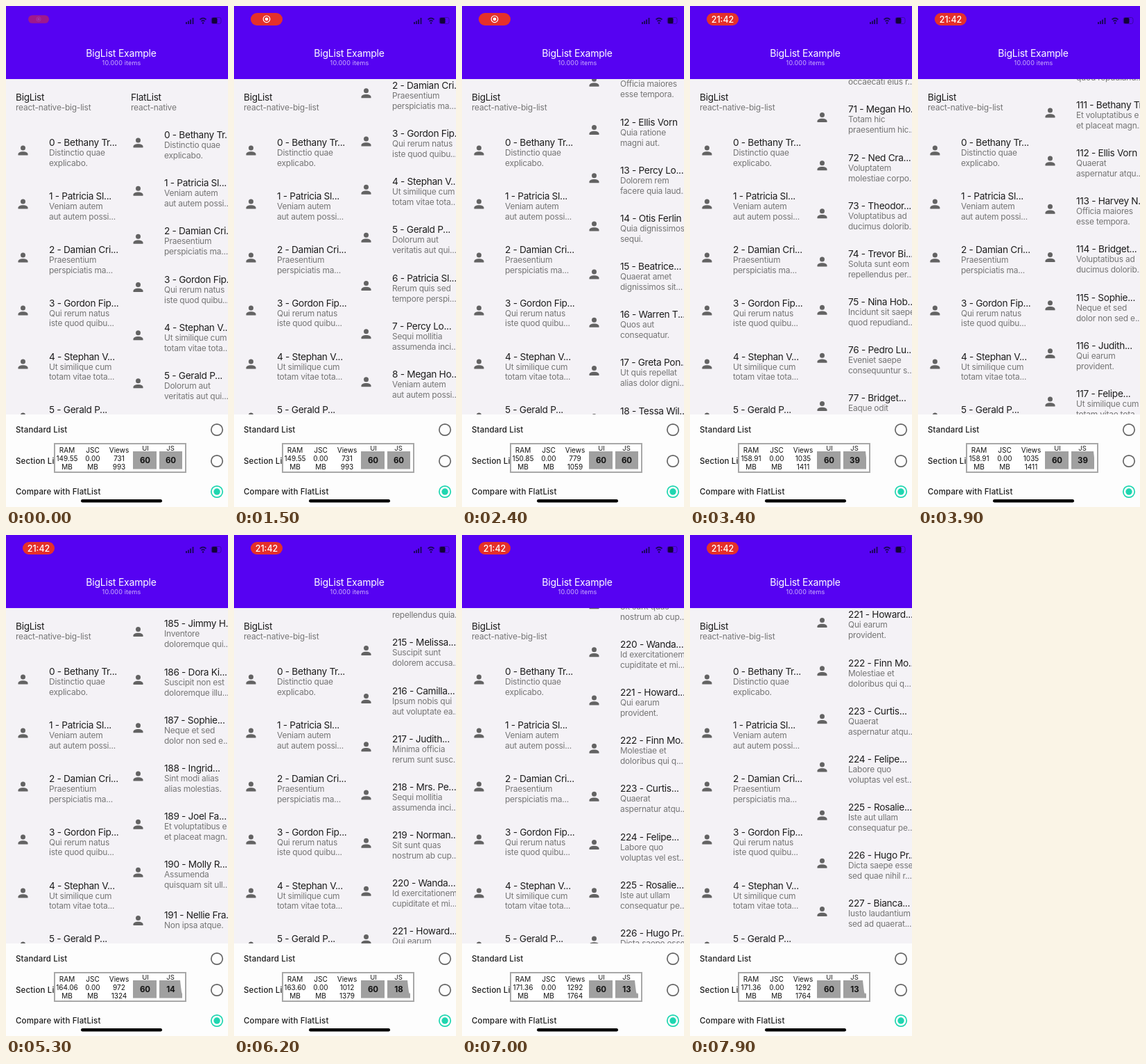
These frames come from a looping animation (320 px wide and 720 px high, 8000 ms). An HTML page:

```html
<!DOCTYPE html>
<html lang="en">
<head>
<meta charset="utf-8">
<title>List comparison</title>
<style>
html, body { margin: 0; width: 100%; height: 100%; overflow: hidden; }
body { position: relative; background: #f4f2f6; font-family: Inter, Roboto, sans-serif; color: #1d1d1d; }
div, svg { position: absolute; }
div { white-space: nowrap; }
#bar { left: 0; top: 0; width: 320px; height: 105px; background: #5602f2; color: #fff; }
.mid { transform: translate(-50%, -50%); text-align: center; }
.col { top: 105px; width: 166px; height: 482px; overflow: hidden; }
.row { left: 0; width: 166px; top: 0; }
.row svg { left: 13.5px; top: 8.5px; }
.text { left: 62px; }
.head .text { left: 14px; }
.title { font-size: 13.65px; line-height: 16px; letter-spacing: -.3px; }
.note { font-size: 11.95px; line-height: 14.5px; letter-spacing: -.2px; color: #757575; }
p { margin: 0; }
#sheet { left: 0; top: 587px; width: 320px; height: 133px; background: #fdfdfd; }
.option { left: 14px; font-size: 11.5px; font-weight: 500; letter-spacing: .15px; line-height: 16px; }
#perf { left: 69px; top: 628px; width: 187px; height: 39px; border: 2px solid #a8a8a8; background: #fff; }
.stat { font-size: 10px; line-height: 12px; color: #111; }
.label { font-size: 9.5px; }
.fps { font-size: 11.5px; font-weight: 700; color: #111; }
#pill { left: 24px; top: 10px; width: 46px; height: 18px; border-radius: 9px; background: #e5302a; }
#clock { left: 23px; top: 8.5px; font-size: 12.5px; font-weight: 500; color: #fff; }
</style>
</head>
<body>
<div id="bar">
  <div id="pill">
    <svg id="rec" width="46" height="18"><circle cx="23" cy="8.8" r="4.8" fill="none" stroke="#fff" stroke-width="1.2"/><circle cx="23" cy="8.8" r="2.4" fill="#fff"/></svg>
    <div id="clock" class="mid">21:42</div>
  </div>
  <svg width="320" height="40" fill="#1d0660">
    <path d="M259 23h2v3h-2zM262 21.500h2v4.500h-2zM265 19.500h2v6.500h-2zM268.500 17h2v9h-2z"/>
    <path d="M279.500 19.500q4.500-4 9 0M281.500 22q2.500-2.200 5 0" fill="none" stroke="#1d0660" stroke-width="1.700"/>
    <circle cx="284" cy="24.500" r="1.300"/>
    <rect x="296.500" y="17" width="8" height="8" rx="1.500" fill="#12023a"/>
    <rect x="296" y="16.500" width="14" height="9" rx="2.500" fill="none" stroke="#3a06a8"/>
  </svg>
  <div class="mid" style="left:166px;top:66.500px;font-size:14px;letter-spacing:-.22px">BigList Example</div>
  <div class="mid" style="left:166.500px;top:81px;font-size:9px;letter-spacing:.15px;opacity:.7">10.000 items</div>
</div>
<div id="left" class="col" style="left:0"></div>
<div id="right" class="col" style="left:166px;width:154px"></div>
<div id="sheet"></div>
<div id="perf"></div>
<div class="stat mid" id="ram" style="left:88px;top:650px"></div>
<div class="stat mid" style="left:125px;top:650px">JSC<br>0.00<br>MB</div>
<div class="stat mid" id="views" style="left:163px;top:650px"></div>
<svg width="320" height="720" fill="#a0a0a0" style="left:0;top:0">
  <rect x="183" y="640" width="34" height="25.500"/>
  <polygon id="graph"/>
  <rect x="108" y="709" width="117" height="4.500" rx="2.200" fill="#000"/>
</svg>
<div class="label mid" style="left:201px;top:635px">UI</div>
<div class="label mid" style="left:237px;top:635px">JS</div>
<div class="fps mid" style="left:200.500px;top:653px">60</div>
<div class="fps mid" id="js" style="left:237.500px;top:653px"></div>

<script>
const $ = id => document.getElementById(id);
const LOOP = 8000, STEP = 100, ROW = 69.17, SHORT = 7.6;

// index | name | first line | second line
const people = `0|Bethany Tr...|Distinctio quae|explicabo.
1|Patricia Sl...|Veniam autem|aut autem possi...
2|Damian Cri...|Praesentium|perspiciatis ma...
3|Gordon Fip...|Qui rerum natus|iste quod quibu...
4|Stephan V...|Ut similique cum|totam vitae tota...
5|Gerald P...|Dolorum aut|veritatis aut qui...
11|Lionel D...|Officia maiores|esse tempora.
12|Ellis Vorn|Quia ratione|magni aut.
13|Percy Lo...|Dolorem rem|facere quia laud...
14|Otis Ferlin|Quia dignissimos|sequi.
15|Beatrice...|Quaerat amet|dignissimos sit...
16|Warren T...|Quos aut|consequatur.
17|Greta Pon...|Ut quis repellat|alias dolor digni...
18|Tessa Wil...|Et nihil|ratione quia.
70|Harvey N...|Non modi|occaecati eius r...
71|Megan Ho...|Totam hic|praesentium hic...
72|Ned Cra...|Voluptatem|molestiae corpo...
73|Theodor...|Voluptatibus ad|ducimus dolorib...
74|Trevor Bi...|Soluta sunt eom|repellendus per...
75|Nina Hob...|Incidunt sit saepe|quod repudiand...
76|Pedro Lu...|Eveniet saepe|consequuntur s...
77|Bridget...|Eaque odit|quia velit.
155|Paula...|Sunt et suscipit.
156|Hattie...|Dolorum earum|consequatur.
157|Victor G...|Aut ullam saepe.
158|Glen Ha...|Quia non eius|recusandae om...
159|Diego...|In aut enim.
160|Vera Mi...|Sed|exercitationem...
161|Gabrie...|Rerum quis sed|tempore perspi...
185|Jimmy H...|Inventore|doloremque qui...
186|Dora Ki...|Suscipit non est|doloremque illu...
187|Sophie...|Neque et sed|dolor non sed e...
188|Ingrid...|Sint modi alias|alias molestias.
189|Joel Fa...|Et voluptatibus e|et placeat magn...
190|Molly R...|Assumenda|quisquam sit ull...
191|Nellie Fra...|Non ipsa atque.
214|Leonie...|Minus|repellendus quia...
215|Melissa...|Suscipit sunt|dolorem accusa...
216|Camilla...|Ipsum nobis qui|aut voluptate ea...
217|Judith...|Minima officia|rerum sunt susc...
218|Mrs. Pe...|Sequi mollitia|assumenda inci...
219|Norman...|Sit sunt quas|nostrum ab cup...
220|Wanda...|Id exercitationem|cupiditate et mi...
221|Howard...|Qui earum|provident.
222|Finn Mo...|Molestiae et|doloribus qui q...
223|Curtis...|Quaerat|aspernatur atqu...
224|Felipe...|Labore quo|voluptas vel est...
225|Rosalie...|Iste aut ullam|consequatur pe...
226|Hugo Pr...|Dicta saepe esse|sed quae nihil r...
227|Bianca...|Iusto laudantium|sed ad quaerat...`.split('\n').map(s => s.split('|'));
const byIndex = new Map(people.map(p => [+p[0], p]));
const shortRows = people.filter(p => p.length < 4).map(p => +p[0]);
const longRows = people.filter(p => p.length > 3);

// Rows without their own entry borrow a name and a note.
function person(i) {
  const pick = k => longRows[(i * k + 5) % longRows.length];
  return byIndex.get(i) || [i, pick(7)[1], ...pick(11).slice(2)];
}

const icon = `<svg width="21" height="21" viewBox="0 0 24 24" fill="#636363"><circle cx="12" cy="8" r="4"/><path d="M12 14c4.420 0 8 1.790 8 4v2H4v-2c0-2.210 3.580-4 8-4z"/></svg>`;
const text = (title, lines) => `<div class="text"><p class="title">${title}</p><p class="note">${lines.join('<br>')}</p></div>`;

function add(parent, cls, html, top) {
  const el = document.createElement('div');
  el.className = cls;
  el.innerHTML = html;
  el.style.top = top + 'px';
  parent.append(el);
  return el;
}

function fill(el, i) {
  const [, name, ...lines] = person(i);
  el.innerHTML = icon + text(`${i} - ${name}`, lines);
  el.lastChild.style.top = lines.length < 2 ? SHORT / 2 + 'px' : 0;
}

add($('left'), 'row head', text('BigList', ['react-native-big-list']), 18);
for (let i = 0; i < 6; i++) fill(add($('left'), 'row', '', 83.4 + 76.8 * i), i);
const heading = add($('right'), 'row head', text('FlatList', ['react-native']), 18);
const pool = Array.from({ length: 11 }, () => ({ el: add($('right'), 'row', '', 0), index: -1 }));

['Standard List', 'Section List', 'Compare with FlatList'].forEach((name, i) => {
  const y = 22 + 44.5 * i, on = i === 2, color = on ? '#1fd6b0' : '#666';
  add($('sheet'), 'option', name, y - 8);
  add($('sheet'), '', `<svg width="22" height="22" style="left:293px"><circle cx="11" cy="11" r="8.200" fill="none" stroke="${color}" stroke-width="1.700"/>${on ? `<circle cx="11" cy="11" r="4.700" fill="${color}"/>` : ''}</svg>`, y - 11);
});

// Scroll distance over time, joined by a smooth curve that never turns back.
const path = [[0, 0], [700, 0], [2400, 848.5], [3400, 4947.6], [4500, 10770.6],
  [5300, 12831.2], [6200, 14871.7], [7700, 15326.7], [LOOP, 15326.7]];
const secant = path.slice(1).map(([t, y], i) => (y - path[i][1]) / (t - path[i][0]));
const slope = path.map((_, i) => {
  const a = secant[i - 1], b = secant[i];
  return a && b ? 2 * a * b / (a + b) : 0;
});

function scrollAt(t) {
  const k = path.findIndex((p, i) => i && t <= p[0]) - 1;
  const [t0, y0] = path[k], [t1, y1] = path[k + 1];
  const d = t1 - t0, u = (t - t0) / d, v = 1 - u;
  return y0 * v * v * (1 + 2 * u) + y1 * u * u * (3 - 2 * u)
    + d * u * v * (slope[k] * v - slope[k + 1] * u);
}

const rowTop = i => i * ROW - SHORT * shortRows.filter(s => s < i).length;

function drawList(scroll) {
  heading.style.transform = `translateY(${-scroll}px)`;
  const first = Math.max(0, Math.floor((scroll - 134) / ROW));
  for (let i = first; i < first + pool.length; i++) {
    const slot = pool[i % pool.length];
    if (slot.index !== i) fill(slot.el, slot.index = i);
    slot.el.style.transform = `translateY(${72 + rowTop(i) - scroll}px)`;
  }
}

// Monitor readings, refreshed once a second.
const ram = ['149.55', '149.55', '150.85', '158.91', '164.06', '164.06', '163.60', '171.36'];
const views = ['731 993', '731 993', '779 1059', '1035 1411', '972 1324', '972 1324', '1012 1379', '1292 1764'];
const fps = [60, 60, 60, 39, 21, 14, 18, 13];
let shown = -1;

function drawMonitor(sec) {
  if (sec === shown) return;
  shown = sec;
  $('ram').innerHTML = `RAM<br>${ram[sec]}<br>MB`;
  $('views').innerHTML = 'Views<br>' + views[sec].replace(' ', '<br>');
  $('js').textContent = fps[sec];
  let points = '221,665.5';
  for (let x = 0; x <= 33; x++) points += ` ${221 + x},${665.5 - 25.5 * (fps[sec - 33 + x] ?? 60) / 60}`;
  $('graph').setAttribute('points', points + ' 254,665.5');
}

function drawPill(t) {
  const grow = Math.min(1, t / 300), time = Math.min(1, Math.max(0, (t - 2800) / 200));
  $('pill').style.transform = `scale(${.65 + .35 * grow})`;
  $('pill').style.opacity = .5 + .5 * grow;
  $('rec').style.opacity = (1 - time) * (.3 + .7 * grow);
  $('clock').style.opacity = time;
}

// The screen refreshes ten times a second; the small lead absorbs timer jitter.
const start = performance.now() - 20;
function frame() {
  const t = Math.floor((performance.now() - start) % LOOP / STEP) * STEP;
  drawList(scrollAt(t));
  drawMonitor(Math.floor(t / 1000));
  drawPill(t);
  requestAnimationFrame(frame);
}
frame();
</script>
</body>
</html>
```
